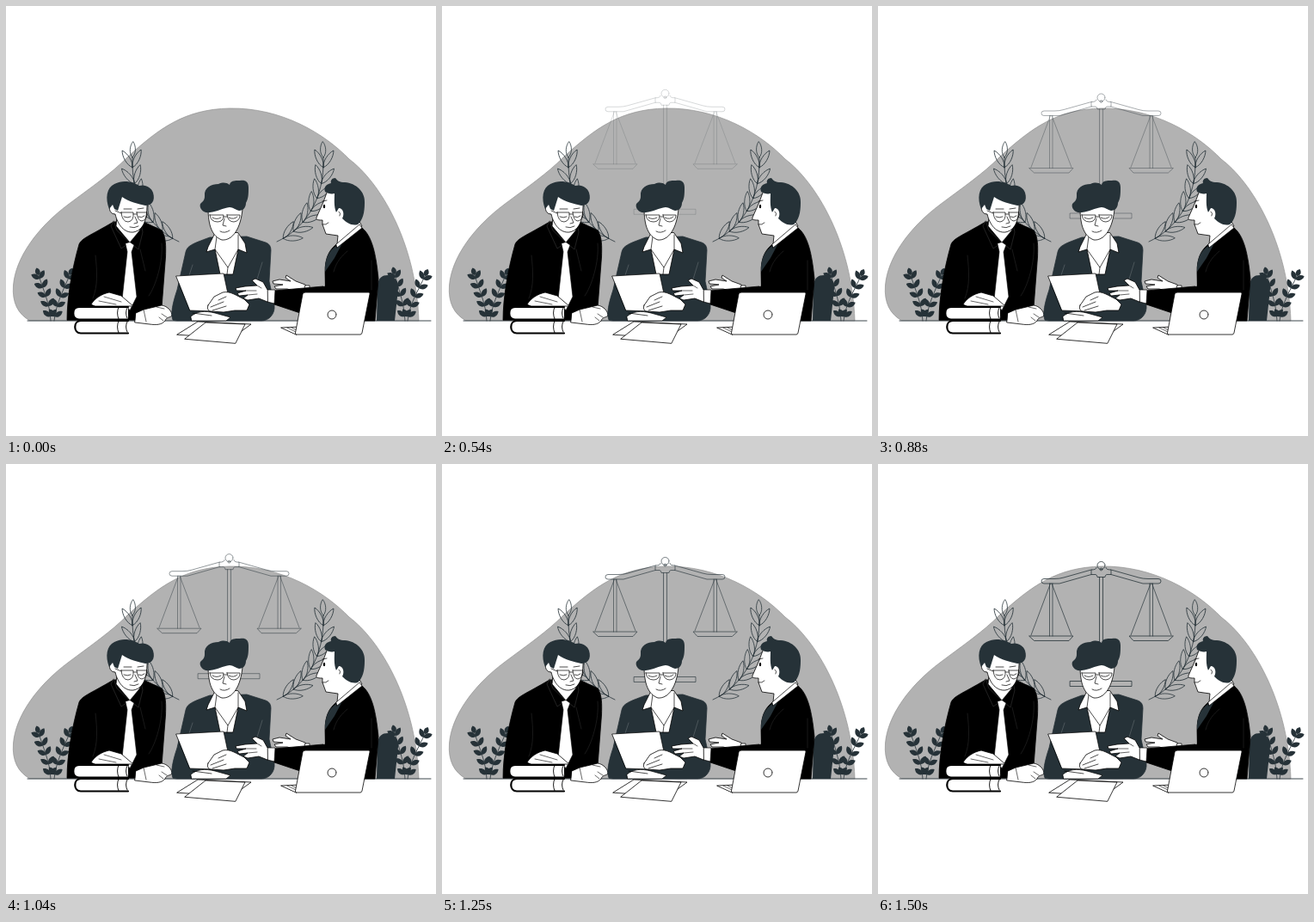
Write an HTML page with a canvas that moves like this. It is 500 px wide and 500 px high and loops after 1.54 s.

```html
<!DOCTYPE html>
<html lang="en">
<head>
<meta charset="utf-8">
<title>Legal meeting</title>
<style>
html, body { margin: 0; width: 100%; height: 100%; overflow: hidden; background: #fff; }
canvas { display: block; width: 500px; height: 500px; }
</style>
</head>
<body>
<canvas id="stage" width="500" height="500"></canvas>
<script>
const ctx = document.getElementById('stage').getContext('2d');
const DARK = '#263238', BLACK = '#000', WHITE = '#fff', GREY = '#b2b2b2';
const LOOP = 1540, APPEAR = 330, MOVE = 420, END = 1500;

ctx.lineJoin = ctx.lineCap = 'round';

function shape(d, fill, stroke, width = 0.8) {
  const path = new Path2D(d);
  if (fill) { ctx.fillStyle = fill; ctx.fill(path); }
  if (stroke) { ctx.strokeStyle = stroke; ctx.lineWidth = width; ctx.stroke(path); }
}
const line = (d, color = DARK, width = 0.8) => shape(d, null, color, width);

function circle(x, y, r, fill, stroke, width = 0.8) {
  ctx.beginPath();
  ctx.arc(x, y, r, 0, Math.PI * 2);
  if (fill) { ctx.fillStyle = fill; ctx.fill(); }
  if (stroke) { ctx.strokeStyle = stroke; ctx.lineWidth = width; ctx.stroke(); }
}

function mirrored(axis, draw) {
  draw();
  ctx.save();
  ctx.translate(axis * 2, 0);
  ctx.scale(-1, 1);
  draw();
  ctx.restore();
}

// Point and heading on a cubic curve given as [x, y] pairs
function along([a, b, c, d], t) {
  const u = 1 - t;
  const at = i => u*u*u*a[i] + 3*u*u*t*b[i] + 3*u*t*t*c[i] + t*t*t*d[i];
  const slope = i => u*u*(b[i]-a[i]) + 2*u*t*(c[i]-b[i]) + t*t*(d[i]-c[i]);
  return { x: at(0), y: at(1), angle: Math.atan2(slope(1), slope(0)) };
}

function leaf(x, y, angle, length, width, fill, stroke) {
  ctx.save();
  ctx.translate(x, y);
  ctx.rotate(angle);
  shape(`M0 0C${length*.25} ${-width} ${length*.75} ${-width*.8} ${length} 0` +
        `C${length*.75} ${width*.8} ${length*.25} ${width} 0 0Z`, fill, stroke, 0.75);
  ctx.restore();
}

function branch(curve, pairs, length, width, spread, fill, stroke) {
  line('M' + curve[0] + 'C' + curve.slice(1).join(' '), DARK, 0.8);
  for (let i = 0; i < pairs; i++) {
    const p = along(curve, 0.08 + 0.84 * i / (pairs - 1));
    for (const side of [-1, 1])
      leaf(p.x, p.y, p.angle + side * spread, length, width, fill, stroke);
  }
  const tip = along(curve, 1);
  leaf(tip.x, tip.y, tip.angle, length * 0.8, width, fill, stroke);
}

function background() {
  shape('M27 365.5C14 358 7 345 8.5 325C11 293 36 258 72 231C100 210 122 195 141 176' +
        'C178 142 208 120 260 119C320 118 370 148 399 178C435 205 477 275 480 365.5Z',
        GREY, '#919191', 0.7);
  mirrored(258, () => branch([[201, 274], [170, 260], [145, 226], [147, 176]],
    7, 23, 4.6, 0.5, null, DARK));
}

function scales(offset, alpha) {
  ctx.save();
  ctx.globalAlpha = alpha;
  ctx.translate(0, offset);
  mirrored(259.5, () => {
    line('M248 123L216 132Q211 133.5 205 133.5H193Q190 133.5 190 136.2Q190 139 193 139H211L248 128.5');
    line('M200.5 139L178 199M202 139L225 199M199.5 139V200M203 139V200', DARK, 0.7);
    line('M176 200H227L222 205.5H182Z');
  });
  line('M254 120.5Q254 123 248 123V128.5H253Q255 129 255 131.5H264Q264 129 266 128.5H271V123Q265 123 265 120.5');
  circle(259.5, 118, 4.5, null, DARK);
  circle(259.5, 122.5, 1.4, null, DARK);
  line('M257.5 131.5V252.5M261.5 131.5V252.5M223.5 252.5H295V258.5H223.5Z');
  ctx.restore();
}

function plants() {
  const stems = [
    [[52, 366], [51, 345], [43, 330], [38, 313]],
    [[56, 366], [58, 346], [67, 330], [74, 313]],
    [[464, 366], [463, 345], [456, 328], [452, 312]],
    [[467, 366], [469, 346], [480, 330], [487, 314]]
  ];
  for (const stem of stems) branch(stem, 5, 11, 4.2, 0.8, DARK);
}

function leftMan() {
  shape('M71 365C71 338 77 305 85 277C88 270 96 268 125 251L158 250L181 261' +
        'C186 268 186 279 185.5 292L181 351L152 365Z', BLACK, BLACK);
  line('M104 290C106 309 107 325 101 340M181 276C183 297 174 326 166 337M156 283L162 308', '#333', 0.5);
  // neck, collar and tie
  shape('M129 244L128 256L144 275L156 262L155 250Z', WHITE, BLACK);
  shape('M125 250L122 256L134 282L144 275L129 261ZM156 260L144 275L154 283L159 263L157 253Z', BLACK, '#444', 0.5);
  shape('M139 276L144 274.5L149 278L146 286L152 338L144 354L135 341L141 286Z', WHITE, BLACK, 0.6);
  // head
  shape('M121 230C119 236 121 242 127 242C130 255 138 264 148 263C159 261 164 250 164 231L157 220L129 221Z', WHITE, BLACK);
  shape('M120 236C115 224 117 211 126 207C137 201 149 205 155 209C162 207 169 211 171 217' +
        'C174 227 169 232 162 232C154 230 143 228 135 222L130 238L126 236L124 231Z', DARK);
  line('M134 240H148Q149 250 142 251Q135 251 134 240ZM152 240H164Q164 249 158 250Q153 250 152 240ZM148 242L152 242M134 241L127 238', BLACK, 0.7);
  line('M137 245Q141 247 145 245M154 245Q158 247 161 244M150 245L153 252L149 253M144 257Q149 259 154 256M137 236L146 236M153 236L160 235', BLACK, 0.7);
  // hands and cuffs
  shape('M99 347C103 340 111 335 120 333L134 337L148 349H104Z', WHITE, BLACK);
  line('M108 343L128 347M114 338L134 344', BLACK, 0.6);
  shape('M151 357L160 353L181 348C188 349 193 355 193 360C190 363 187 361 185 366C181 371 174 371 167 370L150 368Z', WHITE, BLACK);
  line('M160 353L163 367M181 358L187 362M178 362L183 366M175 350L184 352', BLACK, 0.6);
}

function woman() {
  shape('M194 365C191 358 194 345 199 330L209 286C211 279 215 277 237 269L280 268L302 275' +
        'Q308 277 308 284L306 320L312 348C313 358 306 366 297 366H199Z', DARK, DARK);
  line('M217 301L213 313M298 298L291 321', '#71797d', 0.5);
  shape('M244 262L235 280L233 286L243 283L249 312H264L270 283L280 287L278 276L270 264Z', WHITE, BLACK);
  line('M245 268L243 283L258 304L270 283L270 266M258 304L257 312', BLACK, 0.7);
  // head
  shape('M235 235C235 256 240 268 251 272C264 273 273 258 275 236L266 228H243Z', WHITE, BLACK);
  shape('M237 240C230 242 224 235 226 230C229 227 231 226 231 221C230 211 239 207 247 207' +
        'C252 205 256 205 260 208C261 202 269 203 272 203C278 202 282 204 282 211' +
        'C282 218 282 224 279 229C279 234 276 238 271 238C267 237 264 234 260 234' +
        'C252 235 246 239 237 240Z', DARK);
  line('M237 243H253Q253 251 246 251Q238 251 237 243ZM257 243H272Q272 250 265 251Q258 251 257 243ZM253 245L257 245', BLACK, 0.7);
  line('M240 246Q245 249 250 246M259 246Q265 249 269 245M254 247L252 255L256 256M249 262Q254 265 260 261', BLACK, 0.7);
  // lower hand, paper, holding hand
  shape('M215 361C222 355 231 354 243 357L261 362L256 366H216Z', WHITE, BLACK, 0.7);
  shape('M198 314L253 311L260 344L243 355L214 354Z', WHITE, BLACK, 0.7);
  shape('M235 348L242 338L252 333C261 331 268 337 277 341L283 347L280 354L266 354L253 356L238 355C234 354 234 351 235 348Z', WHITE, BLACK);
  line('M238 350L253 344M240 354L256 349M247 342L256 338M217 357L239 360', BLACK, 0.7);
}

function rightMan() {
  shape('M431 366L432 325C433 316 437 313 444 313C452 314 457 320 456 329L452 366Z', DARK);
  shape('M371 309C371 294 375 285 383 278L414 258C425 267 430 286 433 317L429 366H342L344 334L371 326Z', BLACK, BLACK);
  shape('M371 309C370 294 376 284 384 279L391 276L382 293Z', DARK);
  line('M381 309C384 297 391 290 397 285M425 296L425 330', '#333', 0.5);
  // face, neck and collar
  shape('M373 217L369 228L361 246C360 249 364 249 368 249L368 254L372 265L386 267L385 277L414 256L406 242L391 218Z', WHITE, BLACK);
  shape('M384 277L411 254L414 258L385 281Z', WHITE, BLACK, 0.7);
  shape('M371 216C369 210 373 207 378 206C377 203 379 200 383 200C385 203 388 205 394 205' +
        'C407 206 418 216 417 229C417 240 415 249 409 254C402 256 396 252 391 247' +
        'C394 242 392 235 387 235L384 240C381 233 382 224 382 218C378 219 375 218 371 216Z', DARK);
  circle(388, 241, 3.6, WHITE);
  ctx.fillStyle = BLACK;
  ctx.beginPath();
  ctx.ellipse(370, 233, 1.2, 2.2, 0, 0, Math.PI * 2);
  ctx.fill();
  line('M368 227L373 226M368 254Q372 255 375 252M387 239Q390 241 388 244', BLACK, 0.7);
  // far hand
  shape('M353 331L348 324L337 320L326 313L325 316L331 320L318 318L310 320L311 323L322 324L312 326L314 329L327 329L342 333Z', WHITE, BLACK);
  shape('M348 325L353 325V333H347Z', WHITE, BLACK, 0.7);
  // near arm and hand
  shape('M312 331L369 326L382 343L345 358L312 347Z', BLACK, BLACK);
  shape('M304 330L313 330L312 346L304 344Z', WHITE, BLACK, 0.7);
  shape('M304 330L299 321L290 317L286 319L292 325L278 326L267 328L268 331L279 331L269 334L271 337L281 336L276 340L281 342L294 340L304 344Z', WHITE, BLACK);
  line('M279 331L291 331M281 336L292 335M292 325L297 328', BLACK, 0.6);
}

function book(x, y) {
  shape(`M142 ${y}H${x + 8}C${x - 1} ${y} ${x - 1} ${y + 14.5} ${x + 8} ${y + 14.5}H142`, WHITE, BLACK, 2.2);
  line(`M141 ${y + 1}Q138 ${y + 7} 141 ${y + 13}M131 ${y}Q128 ${y + 7} 131 ${y + 14}`, BLACK, 0.9);
}

function desk() {
  line('M25 366H494', DARK, 0.9);
  plants();
  leftMan();
  woman();
  rightMan();
  book(79, 366);
  book(77, 350);
  shape('M199 382L223 367L285 370L263 386Z', WHITE, BLACK);
  shape('M208 387L232 368L278 370L267 392Z', WHITE, BLACK);
  shape('M320 374L342 373L338 382Z', WHITE, BLACK);
  line('M327 374L337 379M332 374L338 377', BLACK, 0.6);
  shape('M347 333H422Q423.5 333 423 335L414 380Q413.5 382 412 382H338Q336 382 336.5 380L345 335Q345.5 333 347 333Z', WHITE, BLACK);
  circle(379, 359, 5, WHITE, BLACK);
}

function draw(time) {
  const t = time % LOOP;
  ctx.clearRect(0, 0, 500, 500);
  background();
  if (t >= APPEAR) {
    const moment = t < MOVE ? APPEAR : Math.min(t, END);
    const p = (moment - APPEAR) / (END - APPEAR);
    scales(-18 * (1 - p ** 1.35), 0.07 + 0.91 * p);
  }
  desk();
}

const start = performance.now();
function tick() {
  draw(performance.now() - start);
  requestAnimationFrame(tick);
}
tick();
</script>
</body>
</html>
```
